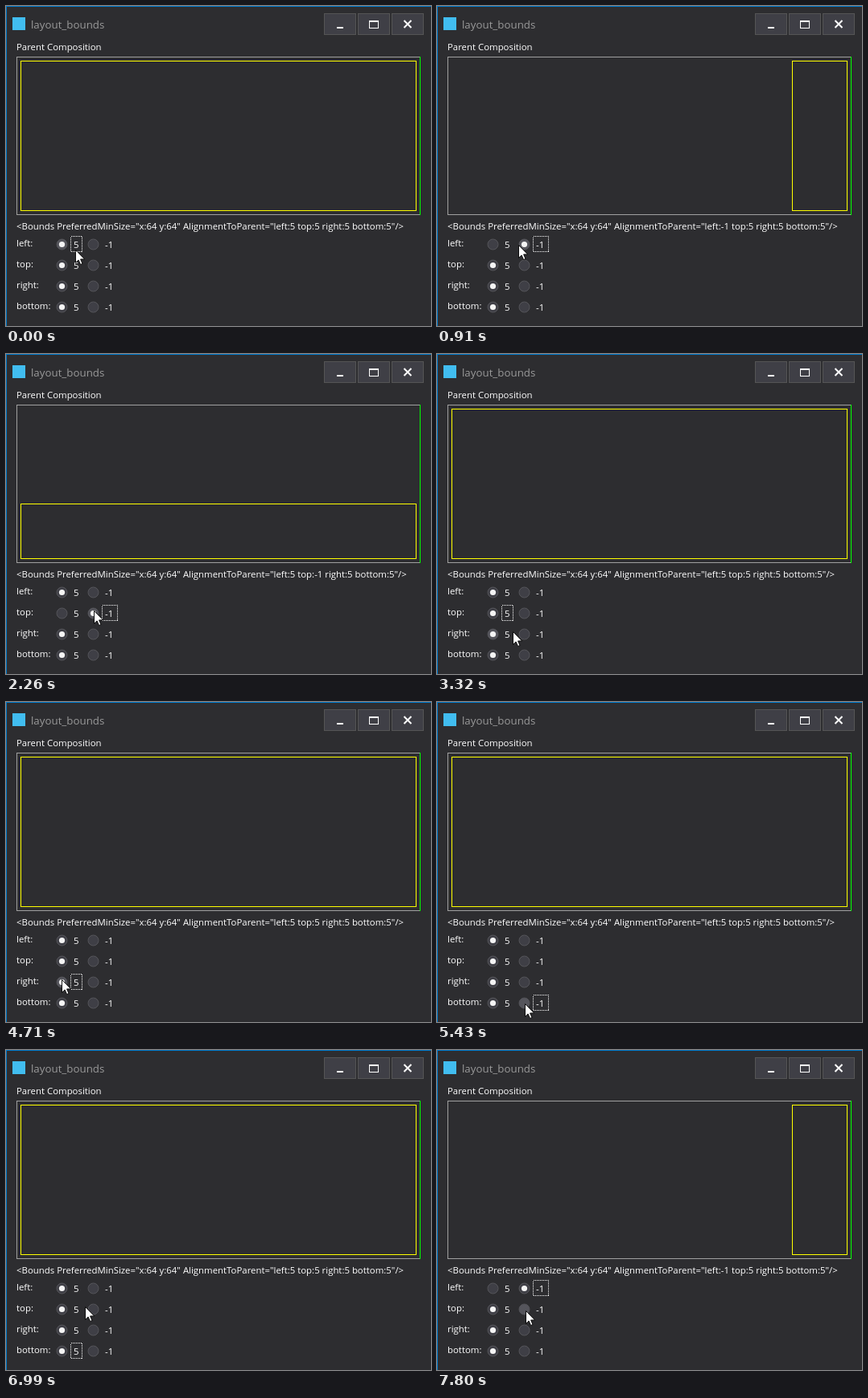
An HTML page for the animation above (8 s loop, 528x398 px).

```html
<!DOCTYPE html>
<html lang="en">
<head>
<meta charset="utf-8">
<title>layout_bounds</title>
<style>
  html, body { margin: 0; width: 528px; height: 398px; overflow: hidden; background: #2d2d30; }
  svg { display: block; }
  text { font: 11.4px "Open Sans", "Noto Sans", sans-serif; fill: #fff; white-space: pre; }
  .title { font-size: 13.3px; fill: #999; }
  .button { fill: #3f3f46; stroke: #555; }
  .glyph { fill: none; stroke: #fff; stroke-width: 2; }
  .line { fill: none; shape-rendering: crispEdges; }
  .radio { stroke: #55555a; }
</style>
</head>
<body>
<svg id="stage" width="528" height="398" viewBox="0 0 528 398">
  <rect width="528" height="398" fill="#2d2d30"/>
  <path class="line" d="M.5 398V.5H528" stroke="#007acc"/>
  <rect x="8" y="14" width="16" height="16" fill="#41bdf0"/>
  <text class="title" x="31" y="28">layout_bounds</text>
  <g class="button">
    <rect x="395.5" y="9.5" width="39" height="26"/>
    <rect x="437.5" y="9.5" width="39" height="26"/>
    <rect x="479.5" y="9.5" width="39" height="26"/>
  </g>
  <path class="glyph" d="M411 27h8M451 19h12M494.5 18l9 9M503.5 18l-9 9"/>
  <path class="line" d="M451.5 19V27.5H462.5V19" stroke="#fff"/>
  <text x="13" y="55">Parent Composition</text>
  <path class="line" d="M514.5 63.5H13.5V259.5H514.5" stroke="#a0a0a0"/>
  <path class="line" d="M514.5 63V260" stroke="#0f0"/>
  <rect id="bounds" class="line" stroke="#ff0"/>
  <text id="markup" x="13" y="278"></text>
  <g id="rows"></g>
  <rect id="focus" class="line" height="19" stroke="#fff" stroke-dasharray="1 1"/>
  <path id="cursor" d="M.5 .5V16.3L4.1 12.9L6.6 18.5L9 17.5L6.6 11.9H11.6Z" fill="#fff" stroke="#000" stroke-width=".9"/>
</svg>
<script>
const LOOP = 8000;
const SIDES = ["left", "top", "right", "bottom"];
const VALUES = [5, -1];
const RADIO_X = [69.5, 108.5];
const TEXT_X = [84, 123];
const FOCUS = [{ x: 80.5, width: 14 }, { x: 119.5, width: 19 }];
const rowY = row => 296.5 + 26 * row;

// Mouse-down time, mouse-up time, row, column
const clicks = [
  [470, 560, 0, 1], [1510, 1600, 0, 0],
  [2170, 2260, 1, 1], [2780, 2870, 1, 0],
  [3700, 3790, 2, 1], [4570, 4710, 2, 0],
  [5430, 5520, 3, 1], [6580, 6670, 3, 0],
  [7390, 7480, 0, 1]
];

// Time, x, y of the pointer tip
const pointerPath = [
  [0, 86, 303], [350, 109, 297], [760, 109, 297], [910, 101, 297], [1390, 70, 297],
  [1620, 70, 297], [2000, 109, 319], [2350, 109, 319], [2550, 70, 321],
  [2920, 70, 321], [3320, 94, 345], [3480, 109, 347], [4030, 109, 347], [4350, 69, 345],
  [4710, 69, 345], [5160, 109, 375], [5650, 109, 375], [5690, 109, 374],
  [5880, 109, 374], [6120, 73, 371], [6710, 73, 371], [7110, 109, 297],
  [7520, 109, 297], [7800, 110, 324], [LOOP, 110, 324]
];

const byId = id => document.getElementById(id);

function setAttrs(node, attrs) {
  for (const name in attrs) node.setAttribute(name, attrs[name]);
  return node;
}

function add(parent, tag, attrs, text = "") {
  const node = document.createElementNS("http://www.w3.org/2000/svg", tag);
  node.textContent = text;
  return parent.appendChild(setAttrs(node, attrs));
}

const radios = SIDES.map((side, row) => {
  const y = rowY(row);
  add(byId("rows"), "text", { x: 13, y: y + 2.5 }, side + ":");
  return VALUES.map((value, col) => {
    const at = { cx: RADIO_X[col], cy: y };
    const disc = add(byId("rows"), "circle", { ...at, r: 6.5, class: "radio" });
    const dot = add(byId("rows"), "circle", { ...at, r: 3.6, fill: "#f4f4f4" });
    add(byId("rows"), "text", { x: TEXT_X[col], y: y + 4.5 }, value);
    return { disc, dot };
  });
});

function pointerAt(t) {
  const next = Math.max(1, pointerPath.findIndex(point => point[0] > t));
  const [t0, x0, y0] = pointerPath[next - 1];
  const [t1, x1, y1] = pointerPath[next];
  const u = (t - t0) / (t1 - t0);
  return [Math.round(x0 + (x1 - x0) * u), Math.round(y0 + (y1 - y0) * u)];
}

function stateAt(t) {
  const chosen = [0, 0, 0, 0];
  let focus = [0, 0];
  for (const [down, up, row, col] of clicks) {
    if (t >= down) focus = [row, col];
    if (t >= up) chosen[row] = col;
  }
  return { chosen, focus };
}

function isHovered(x, y, row, col) {
  const [from, to] = col ? [101, 139] : [62, 96];
  return x >= from && x < to && Math.abs(y - rowY(row)) <= 10;
}

function render(t) {
  const { chosen, focus } = stateAt(t);
  const [x, y] = pointerAt(t);
  const [left, top, right, bottom] = chosen;

  setAttrs(byId("bounds"), {
    x: left ? 441.5 : 18.5,
    y: top ? 186.5 : 68.5,
    width: left ? 68 : right ? 63 : 491,
    height: top ? 68 : bottom ? 63 : 186
  });
  const alignment = SIDES.map((side, row) => `${side}:${VALUES[chosen[row]]}`).join(" ");
  byId("markup").textContent =
    `<Bounds PreferredMinSize="x:64 y:64" AlignmentToParent="${alignment}"/>`;

  radios.forEach((pair, row) => pair.forEach(({ disc, dot }, col) => {
    disc.setAttribute("fill", isHovered(x, y, row, col) ? "#55555c" : "#3f3f46");
    dot.setAttribute("visibility", chosen[row] === col ? "visible" : "hidden");
  }));
  setAttrs(byId("focus"), { ...FOCUS[focus[1]], y: rowY(focus[0]) - 10 });
  byId("cursor").setAttribute("transform", `translate(${x} ${y})`);
}

const start = performance.now();
function tick() {
  render((performance.now() - start) % LOOP);
  requestAnimationFrame(tick);
}
tick();
</script>
</body>
</html>
```
